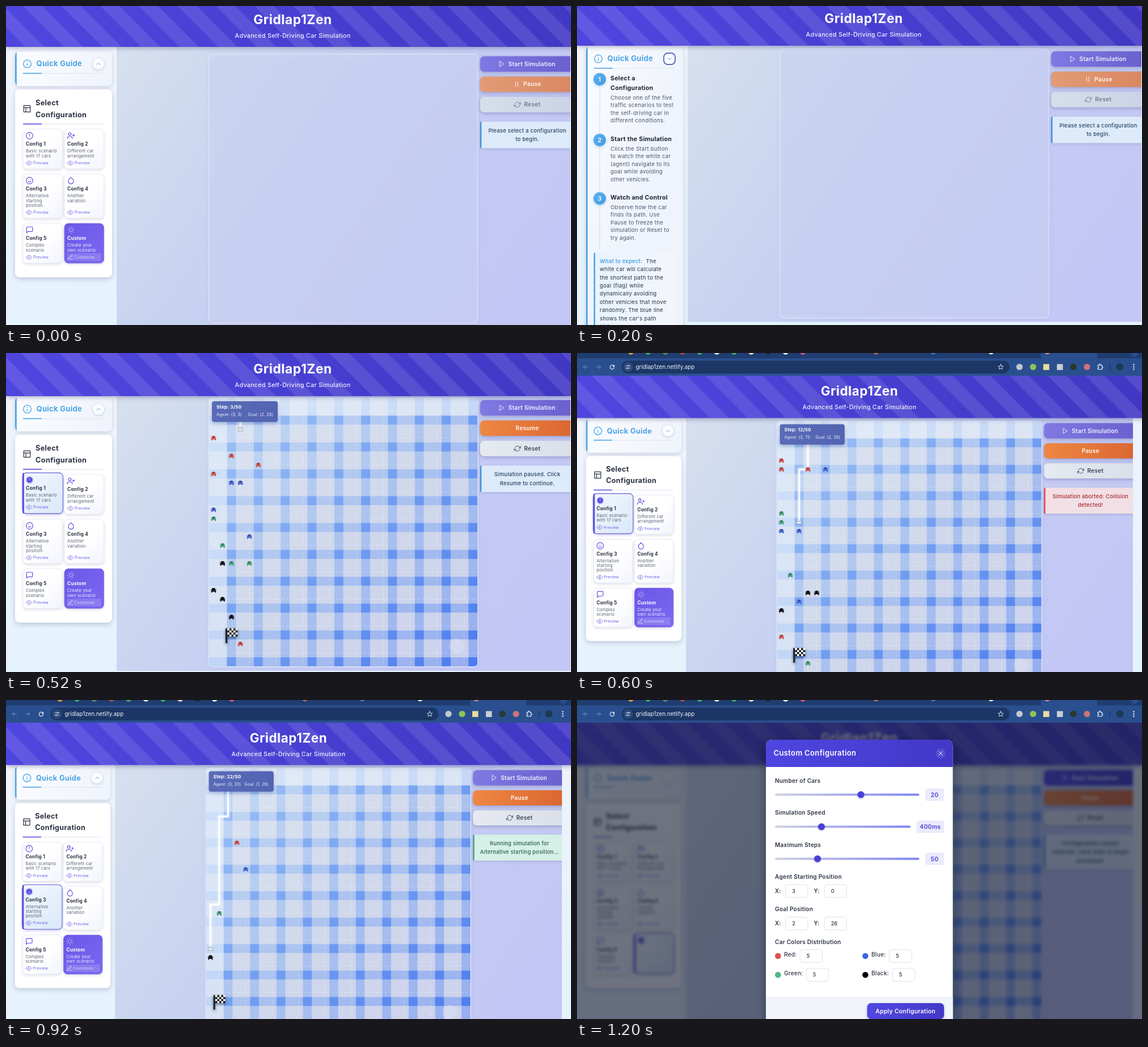
Recreate the animation shown at these times as an HTML page with a canvas. Size 996 by 562 pixels, loop 1400 ms.

```html
<!DOCTYPE html>
<html lang="en">
<head>
<meta charset="utf-8">
<title>Gridlap1Zen</title>
<style>
  html, body { margin: 0; width: 100%; height: 100%; overflow: hidden; }
  canvas { display: block; width: 996px; height: 562px; }
</style>
</head>
<body>
<canvas id="stage" width="996" height="562"></canvas>
<script>
const W = 996, H = 562, HOLD = 200;
const ctx = document.getElementById('stage').getContext('2d');
const INDIGO = '#5a4fdf', BLUE = '#4aa3e6', INK = '#2a3142', GREY = '#566074';
const CELL = 15.77, GX = 358, GY = 78.8;

const disc = (x, y, r) => `M${x - r} ${y}a${r} ${r} 0 1 0 ${2 * r} 0a${r} ${r} 0 1 0 ${-2 * r} 0`;
const RING = disc(12, 12, 10);
const ICONS = {
  info: RING + 'M12 16v-4M12 8h.01',
  alert: RING + 'M12 7v5M12 16h.01',
  user: 'M16 21v-2a4 4 0 0 0-4-4H5a4 4 0 0 0-4 4v2M20 8v6M23 11h-6' + disc(8.5, 7, 4),
  smile: RING + 'M8 14s1.5 2 4 2 4-2 4-2M9 9h.01M15 9h.01',
  drop: 'M12 2.7l5.66 5.66a8 8 0 1 1-11.3 0z',
  chat: 'M21 15a2 2 0 0 1-2 2H7l-4 4V5a2 2 0 0 1 2-2h14a2 2 0 0 1 2 2z',
  sun: disc(12, 12, 5) + 'M12 1v2M12 21v2M4.2 4.2l1.4 1.4M18.4 18.4l1.4 1.4M1 12h2M21 12h2M4.2 19.8l1.4-1.4M18.4 5.6l1.4-1.4',
  eye: 'M1 12s4-8 11-8 11 8 11 8-4 8-11 8-11-8-11-8z' + disc(12, 12, 3),
  pen: 'M12 20h9M16.5 3.5a2.1 2.1 0 0 1 3 3L7 19l-4 1 1-4z',
  layout: 'M3 3h18v18H3zM3 9h18M9 21V9',
  play: 'M5 3l14 9-14 9z',
  pause: 'M8 4v16M16 4v16',
  reset: 'M23 4v6h-6M1 20v-6h6M3.5 9a9 9 0 0 1 14.9-3.4L23 10M1 14l4.6 4.4A9 9 0 0 0 20.5 15',
  up: 'M6 15l6-6 6 6',
  down: 'M6 9l6 6 6-6',
  close: 'M5 5l14 14M19 5L5 19',
  left: 'M20 12H4M11 5l-7 7 7 7',
  right: 'M4 12h16M13 5l7 7-7 7',
  reload: 'M20 5v6h-6M19.5 10a8 8 0 1 0 .3 5',
  star: 'M12 2l3 7 7 .6-5.3 4.7 1.6 7.2L12 17.6 5.7 21.5l1.6-7.2L2 9.6 9 9z',
  puzzle: 'M4 7h5V5a2.5 2.5 0 0 1 5 0v2h5v5h1a2.5 2.5 0 0 1 0 5h-1v5H4v-5h1a2.5 2.5 0 0 0 0-5H4z',
  tune: 'M3 7h9M18 7h3M3 17h3M12 17h9' + disc(15, 7, 3) + disc(9, 17, 3)
};

const CARDS = [
  ['alert', 'Config 1', ['Basic scenario', 'with 17 cars']],
  ['user', 'Config 2', ['Different car', 'arrangement']],
  ['smile', 'Config 3', ['Alternative', 'starting', 'position']],
  ['drop', 'Config 4', ['Another', 'variation']],
  ['chat', 'Config 5', ['Complex', 'scenario']],
  ['sun', 'Custom', ['Create your', 'own scenario']]
];

const GUIDE = [
  [135, ['Select a', 'Configuration'], ['Choose one of the five', 'traffic scenarios to test', 'the self-driving car in', 'different conditions.']],
  [242, ['Start the Simulation'], ['Click the Start button', 'to watch the white car', '(agent) navigate to its', 'goal while avoiding', 'other vehicles.']],
  [345, ['Watch and Control'], ['Observe how the car', 'finds its path. Use', 'Pause to freeze the', 'simulation or Reset to', 'try again.']]
];

const NOTES = {
  info: ['#dceafa', '#3f8fd8', '#27405f'],
  error: ['#f2dfe5', '#d8413d', '#a3282f'],
  ok: ['#d5f0e8', '#469a78', '#2b5b4c']
};
const CAR_TINT = { r: '#c9504c', b: '#4560cc', g: '#459b74', k: '#0c0d10' };

// cars: colour letter followed by column,row
const SCENES = [
  { head: -4, side: 3, main: 5.5, locked: true, note: ['info', 'Please select a configuration', 'to begin.'] },
  { head: -6, side: -6, main: -3.3, locked: true, open: true, note: ['info', 'Please select a configuration', 'to begin.'] },
  { pick: 0, pause: 'Resume', step: 3, agent: [3, 3], goal: [2, 26], trail: [[3, 0], [3, 3]],
    cars: 'r0,4 r2,6 r5,7 r0,8 b2,9 b3,9 b0,12 g0,13 b4,15 g1,16 k1,18 g2,18 g4,18 k0,21 k1,22 k2,24 r3,27',
    note: ['info', 'Simulation paused. Click', 'Resume to continue.'] },
  { tab: true, main: 2.2, pick: 0, step: 12, agent: [2, 11], goal: [2, 26], trail: [[3, 0], [3, 5], [2, 5], [2, 11]],
    cars: 'r0,4 r0,5 r3,5 b5,5 g0,10 g0,11 b0,12 b2,12 g1,17 k3,19 k4,19 b2,20 k0,21 r0,24 g3,27',
    note: ['error', 'Simulation aborted: Collision', 'detected!'] },
  { tab: true, main: 2.2, pick: 2, step: 22, agent: [0, 20], goal: [1, 26],
    trail: [[2, 0], [2, 5], [1, 5], [1, 15], [0, 15], [0, 20]], cars: 'r3,8 b4,11 g1,16 k0,21',
    note: ['ok', 'Running simulation for', 'Alternative starting position...'] },
  { tab: true, main: 2.2, pick: 2, step: 30, agent: [1, 25], goal: [1, 26],
    trail: [[2, 0], [2, 5], [1, 5], [1, 15], [0, 15], [0, 20], [1, 20], [1, 25]], cars: 'r3,4 b5,12 g0,20 k1,20',
    note: ['ok', 'Simulation completed', 'successfully!'] },
  { tab: true, main: 2.2, pick: 5, ready: true, modal: true, grid: true,
    note: ['info', 'Configuration custom', 'selected. Click Start to begin', 'simulation.'] }
];

function text(s, x, y, size, weight, color, align = 'left', space = 0.028) {
  ctx.font = `${weight} ${size}px Inter, "Open Sans", sans-serif`;
  ctx.letterSpacing = size * space + 'px';
  ctx.textAlign = align;
  ctx.textBaseline = 'middle';
  ctx.fillStyle = color;
  ctx.fillText(s, x, y + size * 0.04);
}

function lines(list, x, y, step, ...style) {
  list.forEach((s, i) => text(s, x, y + i * step, ...style));
}

function ramp(x0, y0, x1, y1, ...stops) {
  const g = ctx.createLinearGradient(x0, y0, x1, y1);
  stops.forEach((c, i) => g.addColorStop(i / (stops.length - 1), c));
  return g;
}

function rect(x, y, w, h, fill) {
  ctx.fillStyle = fill;
  ctx.fillRect(x, y, w, h);
}

function box(x, y, w, h, r, fill, { shadow, blur = 8, drop = 2, line, width = 1 } = {}) {
  ctx.save();
  ctx.beginPath();
  ctx.roundRect(x, y, w, h, r);
  if (shadow) {
    ctx.shadowColor = shadow;
    ctx.shadowBlur = blur;
    ctx.shadowOffsetY = drop;
  }
  ctx.fillStyle = fill;
  ctx.fill();
  ctx.restore();
  if (line) {
    ctx.strokeStyle = line;
    ctx.lineWidth = width;
    ctx.stroke();
  }
}

function dot(x, y, r, fill) {
  ctx.beginPath();
  ctx.arc(x, y, r, 0, 7);
  ctx.fillStyle = fill;
  ctx.fill();
}

function icon(name, x, y, size, color, width = 2) {
  ctx.save();
  ctx.translate(x - size / 2, y - size / 2);
  ctx.scale(size / 24, size / 24);
  ctx.lineWidth = width;
  ctx.lineCap = ctx.lineJoin = 'round';
  ctx.strokeStyle = color;
  ctx.stroke(new Path2D(ICONS[name]));
  ctx.restore();
}

function shifted(dy, draw) {
  ctx.save();
  ctx.translate(0, dy);
  draw();
  ctx.restore();
}

function header() {
  ctx.save();
  ctx.shadowColor = 'rgba(40,40,100,.35)';
  ctx.shadowBlur = 8;
  ctx.shadowOffsetY = 2;
  rect(0, 0, 1020, 76, ramp(0, 0, 1000, 76, '#4f46e0', '#4038c4'));
  ctx.restore();
  ctx.save();
  ctx.beginPath();
  ctx.rect(0, 0, 1020, 76);
  ctx.clip();
  ctx.fillStyle = 'rgba(255,255,255,.1)';
  for (let x = -42; x < 1020; x += 68) {
    ctx.beginPath();
    ctx.moveTo(x, 0);
    ctx.lineTo(x + 34, 0);
    ctx.lineTo(x + 110, 76);
    ctx.lineTo(x + 76, 76);
    ctx.fill();
  }
  ctx.restore();
  text('Gridlap1Zen', 505.5, 28.5, 22.6, 700, '#fff', 'center');
  text('Advanced Self-Driving Car Simulation', 505.5, 56.8, 10.7, 500, '#f1f1ff', 'center');
}

function underline(y, color) {
  rect(30, y, 142, 1, '#dde4ef');
  rect(30, y - 0.5, 33, 1.6, color);
}

function guide(open) {
  const h = open ? 600 : 61;
  box(16, 77, 171, h, 8, ramp(16, 77, 187, 138, '#fafcff', '#eff3fb'), { shadow: 'rgba(50,60,110,.2)' });
  ctx.save();
  ctx.beginPath();
  ctx.roundRect(16, 77, 171, h, 8);
  ctx.clip();
  rect(16, 77, 2.8, h, BLUE);
  ctx.restore();
  icon('info', 37.5, 99, 16.5, BLUE);
  text('Quick Guide', 53.5, 99, 12.9, 700, BLUE);
  underline(115.3, BLUE);
  box(153, 89, 20, 20, open ? 7 : 10, '#fafcff', open
    ? { line: '#3340b4', width: 1.5 } : { shadow: 'rgba(50,60,110,.25)', blur: 5, drop: 1 });
  icon(open ? 'down' : 'up', 163, 99, 12, BLUE);
  if (!open) return;

  rect(39.6, 135, 1, 300, '#c6def4');
  GUIDE.forEach(([y, title, body], i) => {
    box(29, y - 11, 22, 22, 11, ramp(29, y - 11, 51, y + 11, '#5bb4f0', '#459ade'), { shadow: 'rgba(60,140,220,.3)', blur: 5 });
    text(i + 1, 40, y, 10.6, 600, '#fff', 'center');
    lines(title, 59, y - 2, 17, 10.6, 700, '#1d2433');
    lines(body, 59, y + 15.8 + (title.length - 1) * 17, 13.4, 9.6, 400, '#4d586b');
  });
  box(29.5, 439, 142.5, 160, 5, ramp(30, 0, 172, 0, '#e9f3fc', '#f3f6fc'));
  rect(29.5, 441, 2.6, 160, BLUE);
  text('What to expect:', 40, 455.5, 9.4, 600, BLUE);
  text('The', 121.5, 455.5, 9.6, 400, INK);
  lines(['white car will calculate', 'the shortest path to the', 'goal (flag) while', 'dynamically avoiding',
    'other vehicles that move', 'randomly. The blue line', "shows the car's path", 'history.'], 40, 470, 14.4, 9.6, 400, INK);
}

function card(i, on) {
  const [name, title, desc] = CARDS[i];
  const row = i >> 1, x = i % 2 ? 103 : 30, y = [214, 293, 380][row] - (on ? 2 : 0), h = row === 1 ? 78 : 70;
  const custom = i === 5, purple = custom && !on, pad = on ? 0.9 : 0;
  const fill = purple ? ramp(x, y, x + 70, y + h, '#6b57e6', '#7c68f0')
    : on ? ramp(x, y, x + 70, y + h, '#f4f8fe', '#d9e8f8') : ramp(x, y, x + 70, y + h, '#fff', '#fff', '#f2f4fd');
  box(x - pad, y - pad, 69.5 + 2 * pad, h + 2 * pad, 7, fill, { shadow: on ? 'rgba(80,70,200,.35)' : 'rgba(50,60,110,.18)', blur: 5,
    line: on ? '#6a61dc' : purple ? '#7f70ea' : '#e6e9f4', width: on ? 1.1 : 0.8 });
  if (on) box(x - pad, y - pad, 2.8, h + 2 * pad, [7, 0, 0, 7], INDIGO);
  const main = custom ? '#fff' : INK, soft = custom ? '#f0eeff' : GREY;
  if (on) {
    dot(x + 11.5, y + 11.5, 7, 'rgba(90,79,223,.3)');
    dot(x + 11.5, y + 11.5, 5.6, INDIGO);
  }
  icon(name, x + 11.5, y + 11.5, 14, on ? '#fff' : custom ? 'rgba(225,220,255,.55)' : INDIGO, on ? 1.2 : 2);
  text(title, x + 5, y + 26.5, 8.4, 700, main);
  lines(desc, x + 5, y + 38.6, 8.4, 7.5, 400, soft);
  const py = y + h - 10.3;
  if (purple) rect(x + 4.5, py - 7, 60, 13.5, 'rgba(255,255,255,.15)');
  icon(custom ? 'pen' : 'eye', x + 10.5, py, 11, custom ? '#e9e6ff' : '#6d63e2', 1.8);
  text(custom ? 'Customize' : 'Preview', x + (custom ? 17 : 18), py, 6.9, 400, custom ? '#dcd6ff' : '#6d63e2');
}

function picker(pick) {
  box(16, 144, 171, 331, 8, '#fff', { shadow: 'rgba(50,60,110,.25)', blur: 10, drop: 3 });
  icon('layout', 37, 178, 15, INK);
  lines(['Select', 'Configuration'], 52, 167.7, 20.6, 12.7, 700, INK);
  underline(204.5, INDIGO);
  CARDS.forEach((_, i) => card(i, i === pick));
}

const at = n => (n + 0.5) * CELL;

function car([col, row], color) {
  ctx.save();
  ctx.translate(GX + at(col), GY + at(row));
  const white = color === '#fff', line = white ? { line: '#8d939f', width: 0.7 } : {};
  box(-2.9, -3.8, 5.8, 4, 1.5, color, line);
  box(-4.4, -0.6, 8.8, 3.2, 1.2, color, line);
  rect(-2, -2.6, 4, 1.5, white ? '#cfd5df' : 'rgba(0,0,0,.35)');
  for (const side of [-1, 1]) {
    rect(side * 3.1 - 0.9, 2, 1.8, 2.2, white ? '#9ca2ad' : color);
    rect(side * 4.2 - 0.6, -1.9, 1.2, 1.1, white ? '#9ca2ad' : color);
    rect(side * 2.8 - 0.6, 0.4, 1.2, 0.9, 'rgba(255,255,255,.4)');
  }
  ctx.restore();
}

function flag([col, row]) {
  ctx.save();
  ctx.translate(GX + at(col) - 10.5, GY + at(row) - 11.5);
  ctx.shadowColor = 'rgba(0,0,0,.5)';
  ctx.shadowBlur = 5;
  ctx.shadowOffsetY = 2;
  rect(0, 0, 3.3, 26, '#22252b');
  rect(3.3, 0, 18, 14.4, '#fff');
  ctx.shadowColor = 'transparent';
  for (let i = 0; i < 20; i++) {
    const c = i % 5, r = i / 5 | 0;
    if ((c + r) % 2) rect(3.3 + c * 3.6, r * 3.6, 3.6, 3.6, '#15171b');
  }
  ctx.restore();
}

function grid() {
  const size = 30 * CELL, block = 3 * CELL, end = [GX + size, GY + size];
  ctx.save();
  ctx.beginPath();
  ctx.roundRect(GX, GY, size, size, 6);
  ctx.clip();
  rect(GX, GY, size, size, ramp(GX, GY, ...end, '#dde6f3', '#d0d8eb', '#cbd1ec'));
  const band = ramp(GX, GY, ...end, 'rgba(150,195,250,.3)', 'rgba(110,160,246,.37)', 'rgba(85,130,242,.46)');
  const cross = ramp(GX, GY, ...end, 'rgba(120,172,248,.32)', 'rgba(80,135,242,.5)', 'rgba(52,108,238,.66)');
  for (let i = 0; i < 10; i++) {
    const o = i * block + 2 * CELL;
    rect(GX + o, GY, CELL, size, band);
    rect(GX, GY + o, size, CELL, band);
  }
  rect(GX, GY, size, 2 * CELL, 'rgba(236,245,255,.4)');
  rect(GX, GY, 2 * CELL, size, 'rgba(222,238,255,.4)');
  for (let i = 0; i < 100; i++) {
    rect(GX + (i % 10) * block + 2 * CELL, GY + (i / 10 | 0) * block + 2 * CELL, CELL, CELL, cross);
  }
  ctx.strokeStyle = 'rgba(255,255,255,.38)';
  ctx.lineWidth = 0.9;
  ctx.setLineDash([4, 4]);
  ctx.beginPath();
  for (let i = 0; i < 10; i++) {
    const o = i * block + 1.5 * CELL;
    ctx.moveTo(GX, GY + o);
    ctx.lineTo(GX + size, GY + o);
    ctx.moveTo(GX + o, GY);
    ctx.lineTo(GX + o, GY + size);
  }
  ctx.stroke();
  ctx.strokeStyle = 'rgba(255,255,255,.28)';
  for (let i = 1; i < 10; i++) for (let j = 1; j < 10; j++) {
    ctx.beginPath();
    ctx.arc(GX + i * block + CELL, GY + j * block + CELL, 8.5, 0, 7);
    ctx.stroke();
  }
  ctx.setLineDash([]);
  dot(794, 516, 13, 'rgba(232,236,246,.28)');
  ctx.restore();
}

function race({ step, agent, goal, trail, cars }) {
  ctx.save();
  ctx.beginPath();
  trail.forEach(([c, r]) => ctx.lineTo(GX + at(c), GY + at(r)));
  ctx.strokeStyle = 'rgba(255,255,255,.9)';
  ctx.lineWidth = 3;
  ctx.lineJoin = 'round';
  ctx.shadowColor = '#fff';
  ctx.shadowBlur = 4;
  ctx.stroke();
  ctx.restore();
  for (const c of cars.split(' ')) car(c.slice(1).split(',').map(Number), CAR_TINT[c[0]]);
  car(agent, '#fff');
  flag(goal);
  box(363, 85, 116, 36.5, 4, ramp(363, 85, 479, 121, '#5a6cb8', '#5263b2'), { shadow: 'rgba(40,50,110,.3)', blur: 8 });
  text(`Step: ${step}/50`, 371, 95, 8.2, 700, '#fff');
  text(`Agent: (${agent.join(', ')})`, 371, 108.4, 7.2, 400, '#f2f4ff');
  text(`Goal: (${goal.join(', ')})`, 426.6, 108.4, 7.2, 400, '#f2f4ff');
}

function button(y, label, colors, ink, sign) {
  box(835.8, y, 176, 27.3, 7, ramp(836, y, 1005, y + 27, ...colors), { shadow: 'rgba(50,55,110,.3)', blur: 6 });
  if (!sign) return text(label, 919, y + 13.7, 10.2, 600, ink, 'center');
  const [name, ix, tx] = sign;
  icon(name, ix, y + 13.7, 12, ink, 1.9);
  text(label, tx, y + 13.7, 10.2, 600, ink);
}

function controls({ locked, ready, pause = 'Pause', note: [kind, ...rows] }) {
  button(83, 'Start Simulation', ready ? ['#4f46e5', '#4038c4'] : ['#8079e3', '#6a5fcd'], ready ? '#fff' : '#f3f2ff', ['play', 874, 885.5]);
  button(118.8, pause, locked ? ['#e29c76', '#d98660'] : ['#ee8744', '#da6530'], '#fff8f2', locked && ['pause', 900.5, 912]);
  button(154.6, 'Reset', locked ? ['#d6deea', '#cbd2e6'] : ['#e6eaf0', '#d9dee8'], locked ? '#727c8f' : '#3b4456', ['reset', 901.5, 913.3]);
  const [bg, bar, ink] = NOTES[kind], h = 15.6 * rows.length + 15.4;
  box(835.8, 198.3, 176, h, 5, bg, { shadow: 'rgba(60,70,130,.18)', blur: 5 });
  box(835.8, 198.3, 2.4, h, [5, 0, 0, 5], bar);
  lines(rows, 919, 214, 15.6, 9.4, 500, ink, 'center');
}

function arena(s) {
  ctx.save();
  ctx.beginPath();
  ctx.rect(195, 60, 800, 500);
  ctx.clip();
  rect(195, 60, 800, 500, ramp(230, 60, 900, 520, '#d5dfee', '#c9d4f0', '#c4cbf3', '#c4c7f5'));
  box(357, 78.8, 475, 474.5, 7, 'rgba(215,222,246,.4)', { shadow: 'rgba(110,115,210,.3)', blur: 10, drop: 1, line: 'rgba(236,240,252,.75)', width: 1 });
  if (s.cars || s.grid) grid();
  if (s.cars) race(s);
  controls(s);
  ctx.restore();
}

function page(s) {
  rect(0, 0, 1020, 600, ramp(0, 60, 60, 570, '#f3f5fc', '#eaf3fc', '#e5f3fd'));
  shifted(s.main || 0, () => arena(s));
  shifted(s.side || 0, () => {
    guide(s.open);
    if (!s.open) picker(s.pick);
  });
  shifted(s.head || 0, header);
}

function chrome() {
  rect(0, 0, W, 40, '#2a4f8f');
  rect(0, 0, W, 9.5, '#1f3d70');
  box(818, -10, 99, 22, 6, '#2a4f8f');
  dot(983, 0, 6.5, '#2a4f8f');
  const tints = ['#e89a45', '#4cae68', '#5f8f6a', '#b0484c', '#4cae68', '#dfe3ea', '#4cae68', '#e6d6c8', '#23262c', '#e8eaf0', '#d8588a'];
  tints.forEach((c, i) => dot(95 + i * 30.3, -2, 5, c));
  [[527, '#d86a4c'], [628, '#3f7ae0'], [730, '#e8eaf0'], [829, '#d88a86']].forEach(([x, c]) => dot(x, -2.5, 5, c));
  icon('left', 15, 24.5, 11, '#7f98c2');
  icon('right', 38, 24.5, 11, '#7f98c2');
  icon('reload', 62, 24.5, 11, '#f0f4fc', 2.4);
  box(78.5, 13.5, 684, 22.5, 11.2, '#1c3765');
  dot(90, 24.7, 8.5, '#2c4a7c');
  icon('tune', 90, 24.7, 10, '#e8eefa');
  text('gridlap1zen.netlify.app', 103.5, 24.5, 9.8, 400, '#f0f4fc', 'left', 0);
  icon('star', 747, 24.5, 11, '#dfe7f6');
  dot(780, 24.5, 5.6, '#c3c8d0');
  dot(804, 24.5, 5.6, '#8fc25a');
  rect(822, 19.5, 10.5, 10.5, '#e9dca0');
  rect(846, 19.5, 10.5, 10.5, '#c9ced6');
  dot(875, 24.5, 5.8, '#29382f');
  dot(899, 24.5, 5.5, '#c9747a');
  icon('puzzle', 922, 24, 11.5, '#eef3fc', 2.4);
  rect(939.5, 18, 1, 13, '#16305c');
  dot(957, 24.5, 6.5, '#1b3a52');
  for (const y of [20.5, 24.5, 28.5]) dot(981.5, y, 1.2, '#eef3fc');
}

function slider(y, label, end, knob, value) {
  text(label, 349, y - 24.5, 10, 600, INK);
  box(349, y - 2, end - 349, 4, 2, ramp(349, 0, end, 0, '#cfd3e0', '#8286f2'));
  box(knob - 6, y - 6, 12, 12, 6, '#4a40d6', { shadow: 'rgba(40,40,120,.35)', blur: 3, drop: 1 });
  box(end + 10.5, y - 11, 636.5 - end, 22, 4, '#eceafb');
  text(value, (end + 657.5) / 2, y + 0.3, 10.4, 600, '#4a40d6', 'center');
}

function field(x, y, value) {
  box(x, y - 11.2, 39.5, 22.5, 4, '#fff', { line: '#dde2ea' });
  text(value, x + 11.7, y, 9.2, 400, '#111', 'left', 0);
}

function position(y, label, a, b) {
  text(label, 349, y - 24.8, 10, 600, INK);
  text('X:', 349, y, 9.8, 600, INK);
  field(367.5, y, a);
  text('Y:', 417.5, y, 9.8, 600, INK);
  field(436, y, b);
}

function share(x, y, color, label, fx) {
  dot(x + 5.3, y, 5.3, color);
  text(label, x + 16, y - 2.4, 10, 500, INK);
  field(fx, y, 5);
}

function modal() {
  ctx.filter = 'blur(2.5px)';
  ctx.drawImage(ctx.canvas, 0, 0);
  ctx.filter = 'none';
  rect(0, 0, W, H, 'rgba(15,23,42,.6)');
  box(333, 70, 329.5, 520, 10, '#fff', { shadow: 'rgba(0,0,0,.35)', blur: 18, drop: 6 });
  box(333, 70, 329.5, 48, [10, 10, 0, 0], ramp(333, 70, 662, 118, '#4f46e2', '#4138c8'));
  text('Custom Configuration', 346.5, 94, 13, 600, '#fff');
  dot(641, 94, 9, 'rgba(255,255,255,.1)');
  icon('close', 641, 94, 11, '#fff');
  slider(166.7, 'Number of Cars', 603.5, 500.5, 20);
  slider(223.3, 'Simulation Speed', 588, 431, '400ms');
  slider(279.8, 'Maximum Steps', 603.5, 424, 50);
  position(336.5, 'Agent Starting Position', 3, 0);
  position(393.8, 'Goal Position', 2, 26);
  text('Car Colors Distribution', 349, 426.2, 10, 600, INK);
  share(349, 451, '#e0504c', 'Red:', 393);
  share(503, 451, '#3b66e6', 'Blue:', 550.5);
  share(349, 484.2, '#4db883', 'Green:', 404);
  share(503, 484.2, '#000', 'Black:', 556);
  rect(333, 524, 329.5, 40, '#f1f5fa');
  rect(333, 524, 329.5, 1, '#e2e7ee');
  box(511.5, 534, 135.5, 28, 7, ramp(511, 534, 647, 562, '#5148e2', '#4138c8'), { shadow: 'rgba(50,50,140,.35)', blur: 5 });
  text('Apply Configuration', 579, 548, 10.3, 600, '#fff', 'center');
}

function draw(s) {
  ctx.setTransform(1, 0, 0, 1, 0, 0);
  ctx.clearRect(0, 0, W, H);
  ctx.save();
  if (s.tab) {
    ctx.translate(0, 39.7);
    ctx.scale(0.985, 0.985);
  }
  page(s);
  ctx.restore();
  if (s.modal) modal();
  if (s.tab) chrome();
}

const start = performance.now();
let shown = -1;

function tick() {
  const i = Math.floor((performance.now() - start) / HOLD) % SCENES.length;
  if (i !== shown) draw(SCENES[shown = i]);
  requestAnimationFrame(tick);
}
tick();
</script>
</body>
</html>
```
